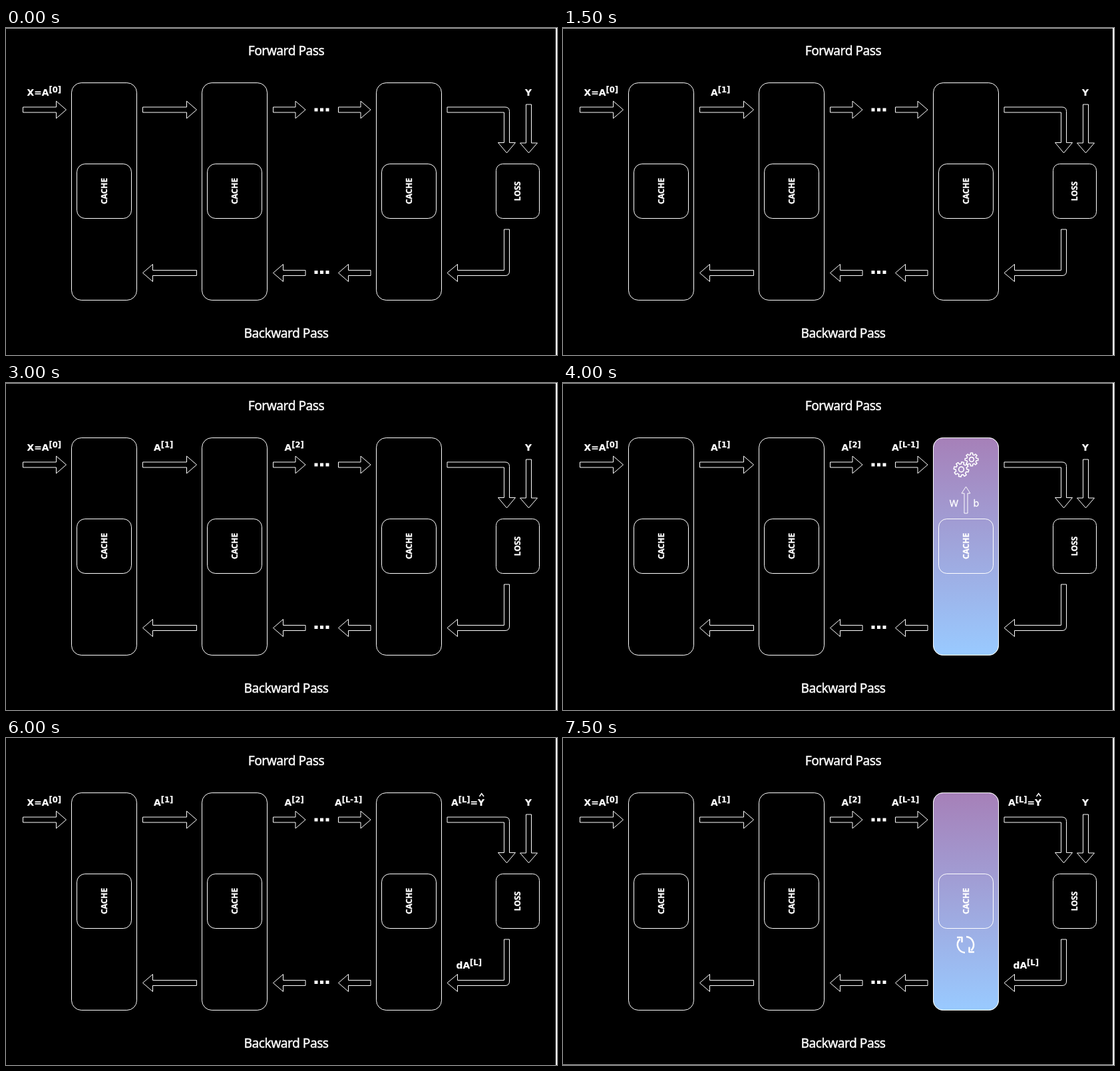
An HTML page that plays this animation: 828x492 px, repeating every 8 s.

```html
<!DOCTYPE html>
<html lang="en">
<head>
<meta charset="utf-8">
<title>Forward and backward pass</title>
<style>
html, body { margin: 0; width: 100%; height: 100%; overflow: hidden; background: #000; }
svg { display: block; fill: none; stroke: #fff; stroke-width: 1; }
text { fill: #fff; stroke-width: .4; font-family: "Noto Sans", "Open Sans", sans-serif; }
.title { font-size: 19.2px; letter-spacing: -.5px; text-anchor: middle; }
.label { font: bold 13.8px "DejaVu Sans", sans-serif; stroke-width: .2; }
.sup { font-size: 11.5px; }
.name { font-size: 12px; font-weight: bold; text-anchor: middle; }
.param { font-size: 14.3px; text-anchor: middle; stroke-width: .3; }
</style>
</head>
<body>
<svg id="stage" width="828" height="492" viewBox="0 0 828 492">
  <defs>
    <linearGradient id="glow" x1="0" y1="0" x2="0" y2="1">
      <stop offset="0" stop-color="#a680b8"/>
      <stop offset="1" stop-color="#99caff"/>
    </linearGradient>
  </defs>
</svg>
<script>
const STEP = 500, STEPS = 16;
const stage = document.getElementById('stage');
let markup = '';
const add = s => { markup += s; };

// Parts inside during() are visible from step a up to, not including, step b.
const during = (a, b, s) => `<g data-from="${a}" data-to="${b}">${s}</g>`;
const path = (d, extra = '') => `<path d="${d}" ${extra}/>`;
const box = (x, y, w, h, r, extra = '') =>
  `<rect x="${x}" y="${y}" width="${w}" height="${h}" rx="${r}" ${extra}/>`;
const text = (cls, x, y, s) => `<text class="${cls}" x="${x}" y="${y}">${s}</text>`;
const upright = (x, y, s) =>
  `<text class="name" transform="translate(${x + 4.3} ${y}) rotate(-90)">${s}</text>`;
const bar = (x, y, w, h, color) => box(x, y, w, h, 0, `fill="${color}" stroke="none"`);

// Outlined arrow starting at (x, y), pointing along the given angle.
function arrow(x, y, length, angle, shaft = 4, head = 13, tip = 15) {
  const neck = length - tip;
  return path(`M0 ${-shaft}H${neck}V${-head}L${length} 0L${neck} ${head}V${shaft}H0Z`,
    `transform="translate(${x} ${y}) rotate(${angle})"`);
}

function label(x, y, base, sup, rest = '') {
  return `<text class="label" x="${x}" y="${y}">${base}<tspan class="sup" dy="-5">[${sup}]</tspan>` +
    `<tspan dy="5">${rest}</tspan></text>`;
}

function gear(cx, cy, r, turn) {
  const teeth = 8, points = [];
  for (let i = 0; i < teeth; i++) {
    for (const [offset, k] of [[-.3, .74], [-.2, 1], [.2, 1], [.3, .74]]) {
      const a = (i + offset) / teeth * 2 * Math.PI + turn;
      points.push((cx + r * k * Math.cos(a)).toFixed(2) + ' ' + (cy + r * k * Math.sin(a)).toFixed(2));
    }
  }
  return path(`M${points.join('L')}Z`) + `<circle cx="${cx}" cy="${cy}" r="${r * .34}"/>`;
}

// Icons are drawn around (0, 0).
const gears = gear(-7, 6, 11.3, .2) + gear(8.5, -9, 9.9, 0);
const floppy = path('M-15 -17H12L17 -12V14.5Q17 17 14.5 17H-14.5Q-17 17 -17 14.5V-15Q-17 -17 -15 -17Z') +
  path('M-9.5 -17V-7Q-9.5 -5.5 -8 -5.5H8Q9.5 -5.5 9.5 -7V-17M3.5 -13.5H6.5V-8.5H3.5Z') +
  path('M-11 17V3Q-11 1.5 -9.5 1.5H9.5Q11 1.5 11 3V17M-14.5 13.5h1.5M13 13.5h1.5');
const half = 'M1 -12A12 12 0 0 1 8.5 8.5M13 11H5.5V3.5';
const refresh = path(half) + path(half, 'transform="rotate(180)"');
const icon = (x, y, s, width = 1.6) =>
  `<g transform="translate(${x} ${y})" stroke-width="${width}" stroke-linejoin="round">${s}</g>`;

const params = (x, y, left, right, gapL, gapR) =>
  text('param', x - gapL, y, left) + text('param', x + gapR, y, right);
const small = (x, y, angle) => arrow(x, y, 40, angle, 2.5, 6.5, 10);
const compute = x => icon(x, 124, gears) + small(x, 196, -90) + params(x, 186, 'W', 'b', 18, 15.5);
const save = x => icon(x - .5, 124, floppy) + small(x, 156.5, 90) + params(x, 178, 'dW', 'db', 22.5, 19.5);
const gradients = x => icon(x, 364, gears) + small(x, 295, 90) + params(x, 317, 'dW', 'db', 22.5, 19.5);

// Frame edges
add(during(0, 12, bar(0, 0, 827, 1, '#aaa')) + during(13, STEPS, bar(0, 491, 827, 1, '#aaa')));
add(bar(826, 0, 2, 492, '#fff'));
add(text('title', 421, 41, 'Forward Pass') + text('title', 421, 466, 'Backward Pass'));

// Layers: left edge and the spans of steps in which they glow
const layers = [[98.5, [[1, 3]]], [294.5, [[4, 6]]], [556.5, [[8, 10], [13, 16]]]];
for (const [x, spans] of layers) {
  const mid = x + 49;
  add(box(x, 82.5, 98, 327, 14.7));
  for (const [a, b] of spans) {
    add(during(a, b, box(x, 82.5, 98, 327, 14.7, 'fill="url(#glow)"')));
    if (a < 13) add(during(a, a + 1, compute(mid)) + during(a + 1, b, save(mid)));
    else add(during(a, a + 2, gradients(mid)) + during(a + 2, b, icon(mid - .5, 311, refresh, 2.5)));
  }
  add(box(x + 8, 204.5, 82, 82, 12.3) + upright(mid + .5, 245.5, 'CACHE'));
}

add(box(736.5, 204.5, 65, 82, 9.9));
add(during(11, 12, box(736.5, 204.5, 65, 82, 9.9, 'fill="url(#glow)"')));
add(upright(769, 245.5, 'LOSS'));

// Arrows between layers
add(arrow(25.5, 123, 65, 0) + arrow(785.5, 115, 73, 90));
for (const [x, length] of [[205.5, 81], [401.5, 48.5], [499.5, 48.5]])
  add(arrow(x, 123, length, 0) + arrow(x + length, 368.5, length, 180));
add(path('M663 119H750Q756.5 119 756.5 125.5V172.5H765.5L752.5 188L739.5 172.5H748.5V127H663Z'));
add(path('M748.5 303V364.5H678.5V355.5L663 368.5L678.5 381.5V372.5H750Q756.5 372.5 756.5 366V303Z'));

for (const y of [120.5, 365])
  for (const x of [463.5, 472, 480.5])
    add(bar(x, y, 5, 5, '#fff'));

// Labels
add(label(31.5, 102, 'X=A', '0') + text('label', 780, 102, 'Y'));
add(during(3, STEPS, label(222, 102, 'A', '1')));
add(during(6, STEPS, label(418.5, 102, 'A', '2')));
add(during(7, STEPS, label(494, 102, 'A', 'L-1')));
add(during(10, STEPS, label(669, 102, 'A', 'L', '=Y') +
  path('M711.5 88L714.7 83.5L718 88', 'stroke-width="1.5"')));
add(during(12, STEPS, label(676.5, 347, 'dA', 'L')));

stage.insertAdjacentHTML('beforeend', markup);
const timed = [...stage.querySelectorAll('[data-from]')];

function draw() {
  const step = Math.floor(performance.now() / STEP) % STEPS;
  for (const part of timed) {
    const { from, to } = part.dataset;
    part.style.display = step >= +from && step < +to ? '' : 'none';
  }
  requestAnimationFrame(draw);
}
draw();
</script>
</body>
</html>
```
